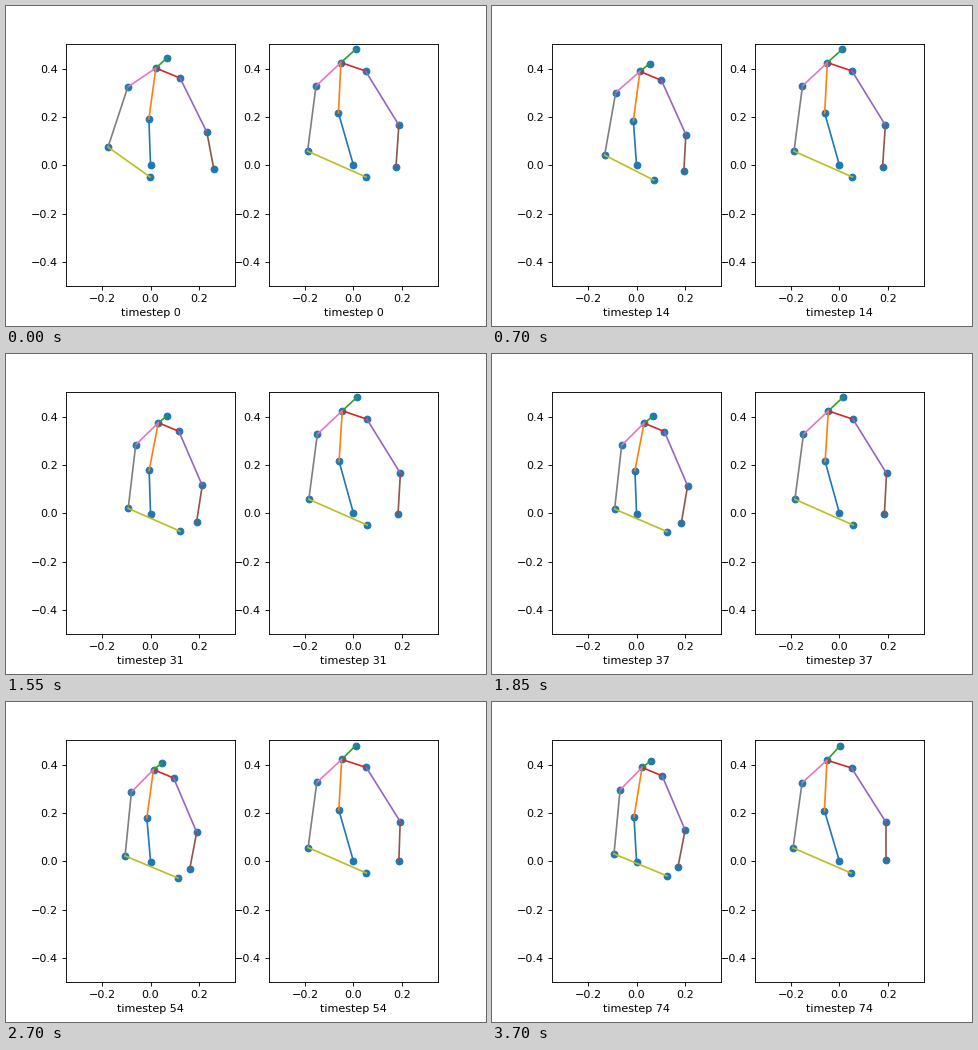
Animation, 480 px wide and 320 px high, one loop 3750 ms. Source, as a matplotlib script:

```python
import numpy as np
import matplotlib.pyplot as plt
from matplotlib.animation import FuncAnimation

FRAMES, INTERVAL = 75, 50
LAST = FRAMES - 1

# Poses in thousandths of an axis unit, joint order:
# hip, chest, neck, head, right shoulder-elbow-hand, left shoulder-elbow-hand.
LEFT_START = [(0, 0), (-7, 191), (22, 402), (68, 444), (122, 361), (233, 137),
              (262, -16), (-94, 324), (-176, 75), (-2, -49)]
LEFT_END = [(0, -1.4), (-11, 183), (22, 388), (58, 415), (105, 353), (200, 129),
            (170, -24), (-69, 295), (-94, 30), (126, -61)]
RIGHT_START = [(0, 0), (-62, 216), (-52, 425), (11, 481), (50, 390), (188, 166),
               (176, -7), (-155, 328), (-190, 58), (52, -49)]
RIGHT_END = [(0, 0), (-62, 208), (-52, 418), (2, 477), (50, 386), (192, 162),
             (192, 5), (-155, 324), (-192, 55), (48, -49)]

BONES = [(0, 1), (1, 2), (2, 3), (2, 4), (4, 5), (5, 6), (2, 7), (7, 8), (8, 9)]

# The hip stays put, the chest follows about half of every body shift.
FOLLOW = np.array([0, 0.45] + [1] * 8)[:, None]


def swell(step):
    return np.sin(np.pi * step / LAST) ** 2


def left_pose(step):
    """Quick relaxation into a lower pose, with a sideways sway and a dip."""
    blend = 1 - np.exp(-step / 14)
    sway = np.interp(step, [0, 14, 25, 35, 46, 63, LAST], [0, -8, 5, 14, -13, -6, 1])
    return blend, (sway, -16 * swell(step))


def right_pose(step):
    """Almost still: a slow drift and a slight lean."""
    return (step / LAST) ** 2, (6 * swell(step), 0)


class Skeleton:
    def __init__(self, ax, start, end, motion):
        self.ax, self.motion = ax, motion
        self.start, self.end = np.array(start, float), np.array(end, float)
        ax.set(xlim=(-0.35, 0.35), ylim=(-0.5, 0.5),
               xticks=[-0.2, 0, 0.2], yticks=[-0.4, -0.2, 0, 0.2, 0.4])
        self.dots = ax.scatter(*self.start.T, color="C0")
        self.lines = [ax.plot([], [], color=f"C{k}")[0] for k in range(len(BONES))]

    def pose(self, step):
        blend, shift = self.motion(step)
        points = self.start + (self.end - self.start) * blend + FOLLOW * shift
        points /= 1000
        self.dots.set_offsets(points)
        for line, bone in zip(self.lines, BONES):
            line.set_data(*points[list(bone)].T)
        self.ax.set_xlabel(f"timestep {step}")


fig, (ax_left, ax_right) = plt.subplots(1, 2, figsize=(6, 4), dpi=80)
fig.subplots_adjust(bottom=0.125)
skeletons = [Skeleton(ax_left, LEFT_START, LEFT_END, left_pose),
             Skeleton(ax_right, RIGHT_START, RIGHT_END, right_pose)]


def update(step):
    for skeleton in skeletons:
        skeleton.pose(step)


anim = FuncAnimation(fig, update, frames=FRAMES, interval=INTERVAL,
                     init_func=lambda: update(0), repeat=True, repeat_delay=0)
plt.show()
```
